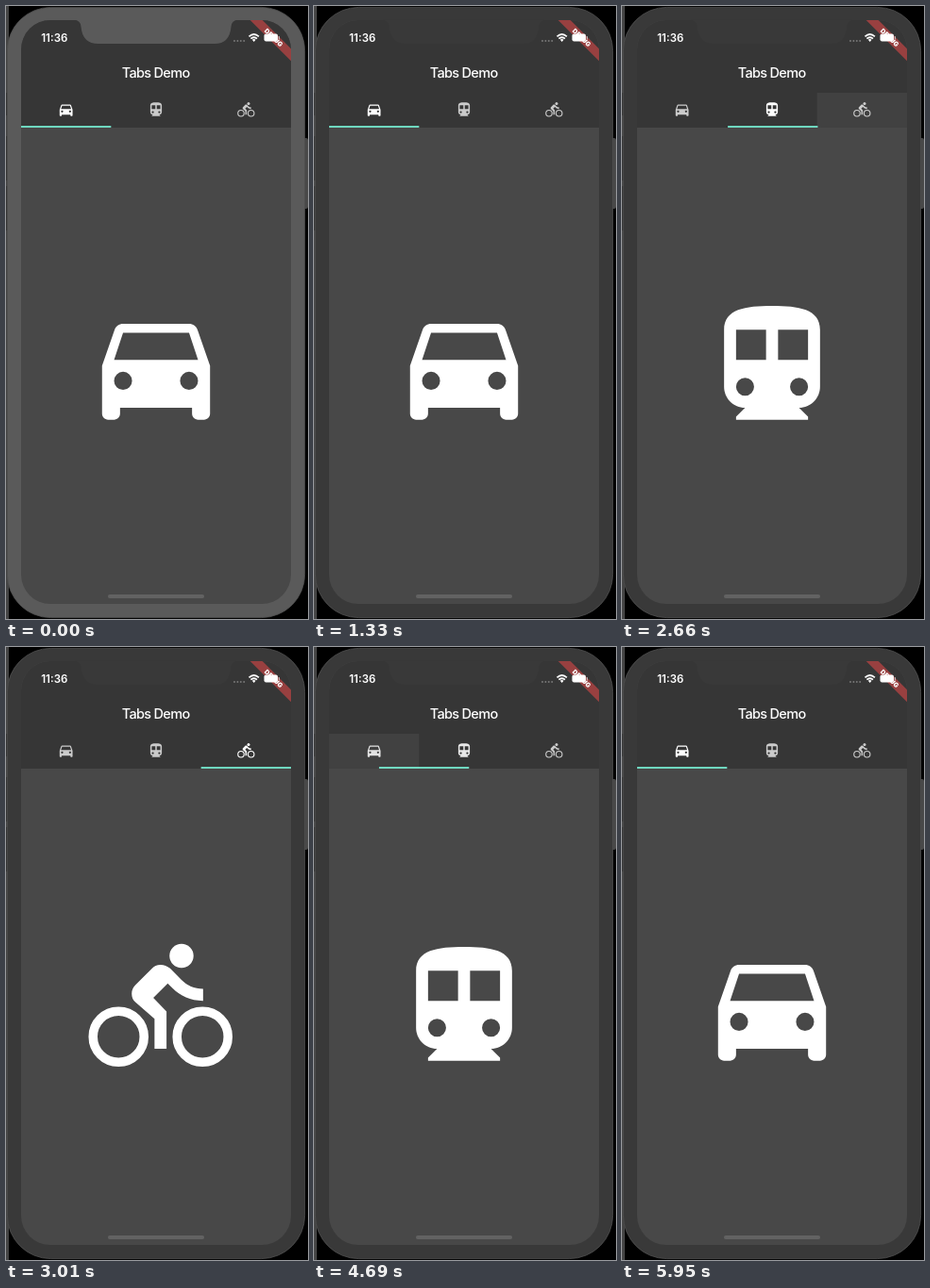
These frames come from a looping animation (320 by 650 pixels, 6.16 s). An HTML page:

```html
<!DOCTYPE html>
<html lang="en">
<head>
<meta charset="utf-8">
<title>Tabs Demo</title>
<style>
  html, body { margin: 0; width: 100%; height: 100%; overflow: hidden; background: #000; }
  svg { display: block; width: 320px; height: 650px; }
  text { font-family: Inter, sans-serif; fill: #fff; text-anchor: middle; }
</style>
</head>
<body>
<svg viewBox="0 0 320 650">
  <defs>
    <clipPath id="screen"><rect x="16" y="15" width="286" height="619" rx="31"/></clipPath>
    <clipPath id="body"><rect x="16" y="129" width="286" height="505"/></clipPath>
    <path id="car" d="M18.92 6.01C18.72 5.42 18.16 5 17.5 5h-11c-.66 0-1.21.42-1.42 1.01L3 12v8c0 .55.45 1 1 1h1c.55 0 1-.45 1-1v-1h12v1c0 .55.45 1 1 1h1c.55 0 1-.45 1-1v-8zM6.5 16a1.5 1.5 0 1 1 0-3 1.5 1.5 0 0 1 0 3zm11 0a1.5 1.5 0 1 1 0-3 1.5 1.5 0 0 1 0 3zM5 11l1.5-4.5h11L19 11z"/>
    <path id="train" fill-rule="evenodd" d="M12 2c-4.42 0-8 .5-8 4v9.5C4 17.43 5.57 19 7.5 19L6 20.5v.5h12v-.5L16.5 19c1.93 0 3.5-1.57 3.5-3.5V6c0-3.5-3.58-4-8-4zM7.5 17a1.5 1.5 0 1 1 0-3 1.5 1.5 0 0 1 0 3zM11 11H6V6h5zm5.5 6a1.5 1.5 0 1 1 0-3 1.5 1.5 0 0 1 0 3zM18 11h-5V6h5z"/>
    <g id="bike">
      <circle cx="15.5" cy="3.5" r="2"/>
      <g fill="none" stroke="#fff" stroke-width="1.5">
        <circle cx="5" cy="17" r="4.25"/><circle cx="19" cy="17" r="4.25"/>
      </g>
      <path d="M10.8 10.5l2.4-2.4.8.8c1.3 1.3 3 2.1 5.1 2.1V9c-1.5 0-2.7-.6-3.6-1.5l-1.9-1.9c-.5-.4-1-.6-1.6-.6s-1.1.2-1.4.6L7.8 8.4c-.4.4-.6.9-.6 1.4 0 .6.2 1.1.6 1.4L11 14v5h2v-6.2z"/>
    </g>
  </defs>

  <!-- phone -->
  <rect width="3" height="650" fill="#444"/>
  <path d="M0 92h3v24H0zM0 138h3v47H0zM0 191h3v47H0z" fill="#333"/>
  <rect x="314" y="140" width="6" height="75" rx="2" fill="#484848"/>
  <rect class="bezel" x="1.4" y="1.4" width="315.2" height="647.2" rx="46" stroke="#505050" stroke-width=".8"/>

  <g clip-path="url(#screen)">
    <rect x="16" y="15" width="286" height="619" fill="#484848"/>
    <g clip-path="url(#body)"><g id="pages" fill="#fff"></g></g>
    <rect x="16" y="15" width="286" height="114" fill="#363636"/>
    <rect id="ink" y="92" width="95.33" height="37" fill="#fff" fill-opacity=".055"/>
    <g id="tabs" fill="#fff"></g>
    <rect id="bar" y="127.2" width="95.33" height="1.6" fill="#7dffe2"/>
    <text x="158.6" y="76.3" font-size="14.5" font-weight="500" letter-spacing="-.68">Tabs Demo</text>
    <g transform="translate(302 15) rotate(45)">
      <rect x="-31" y="21.4" width="62" height="9.2" fill="#984040"/>
      <text y="28.5" font-size="6.9" font-weight="900">DEBUG</text>
    </g>
    <rect x="108" y="624" width="102" height="4" rx="2" fill="#626262"/>
  </g>
  <path class="bezel" d="M72 14.5Q79 15 79.5 22Q81 40 98 40H221Q237 40 238.5 22Q239 15 246 14.5z"/>

  <!-- status bar -->
  <text x="51.3" y="37.7" font-size="11.5" font-weight="600">11:36</text>
  <path d="M242 37h10.5" stroke="#777" stroke-width="2" stroke-linecap="round" stroke-dasharray="0 3.4"/>
  <g fill="none" stroke="#fff" stroke-width="1.8">
    <path d="M257.5 32.3q5.2-4.6 10.4 0M259.4 34.6q3.3-2.8 6.6 0"/>
  </g>
  <path d="M260.8 35.7q1.9-1.5 3.8 0l-1.9 2.2z" fill="#fff"/>
  <rect x="273.5" y="29.5" width="14.5" height="8" rx="2" fill="#fff"/>
  <rect x="288.8" y="32" width="1.2" height="3" rx=".6" fill="#bbb"/>
</svg>
<script>
const LOOP = 6160, STEP = 70, PAGE = 286, TAB = PAGE / 3, SLIDE = 300;
const icons = ['car', 'train', 'bike'];
// The page starts sliding a little after the tab indicator.
const taps = [
  { tab: 1, at: 1473, page: 1526 },
  { tab: 2, at: 2655, page: 2760 },
  { tab: 1, at: 3603, page: 3719 },
  { tab: 0, at: 4610, page: 4716 }
];
const get = id => document.getElementById(id);

const iconAt = (name, x, y, scale) =>
  `<use href="#${name}" transform="translate(${x} ${y}) scale(${scale}) translate(-12 -12)"/>`;
get('pages').innerHTML = icons.map((n, i) => iconAt(n, 159 + i * PAGE, 381.5, 6.356)).join('');
get('tabs').innerHTML = icons.map((n, i) => iconAt(n, 16 + (i + .5) * TAB, 109.9, .763)).join('');
const tabIcons = [...get('tabs').children];
const bezels = document.querySelectorAll('.bezel');

// cubic-bezier(.25, .1, .25, 1)
function ease(x) {
  if (x <= 0 || x >= 1) return x <= 0 ? 0 : 1;
  let lo = 0, hi = 1, u;
  for (let i = 0; i < 24; i++) {
    u = (lo + hi) / 2;
    if (.75 * u * (1 - u) + u ** 3 < x) lo = u; else hi = u;
  }
  return .3 * u * (1 - u) ** 2 + 3 * u * u * (1 - u) + u ** 3;
}

function position(t, start) {
  let pos = 0;
  for (const tap of taps) pos += (tap.tab - pos) * ease((t - tap[start]) / SLIDE);
  return pos;
}

function draw(now) {
  const t = Math.floor(now % LOOP / STEP) * STEP;
  const active = position(t, 'at');
  get('pages').setAttribute('transform', `translate(${-PAGE * position(t, 'page')} 0)`);
  get('bar').setAttribute('x', 16 + TAB * active);
  tabIcons.forEach((icon, i) =>
    icon.setAttribute('opacity', .74 + .26 * Math.max(0, 1 - Math.abs(active - i))));

  const pressed = taps.find(tap => t >= tap.at && t < tap.at + 270);
  get('ink').setAttribute('opacity', pressed ? 1 : 0);
  if (pressed) get('ink').setAttribute('x', 16 + TAB * pressed.tab);

  bezels.forEach(b => b.setAttribute('fill', t < 1330 ? '#5a5a5a' : '#393939'));
  requestAnimationFrame(() => draw(performance.now()));
}
draw(performance.now());
</script>
</body>
</html>
```
